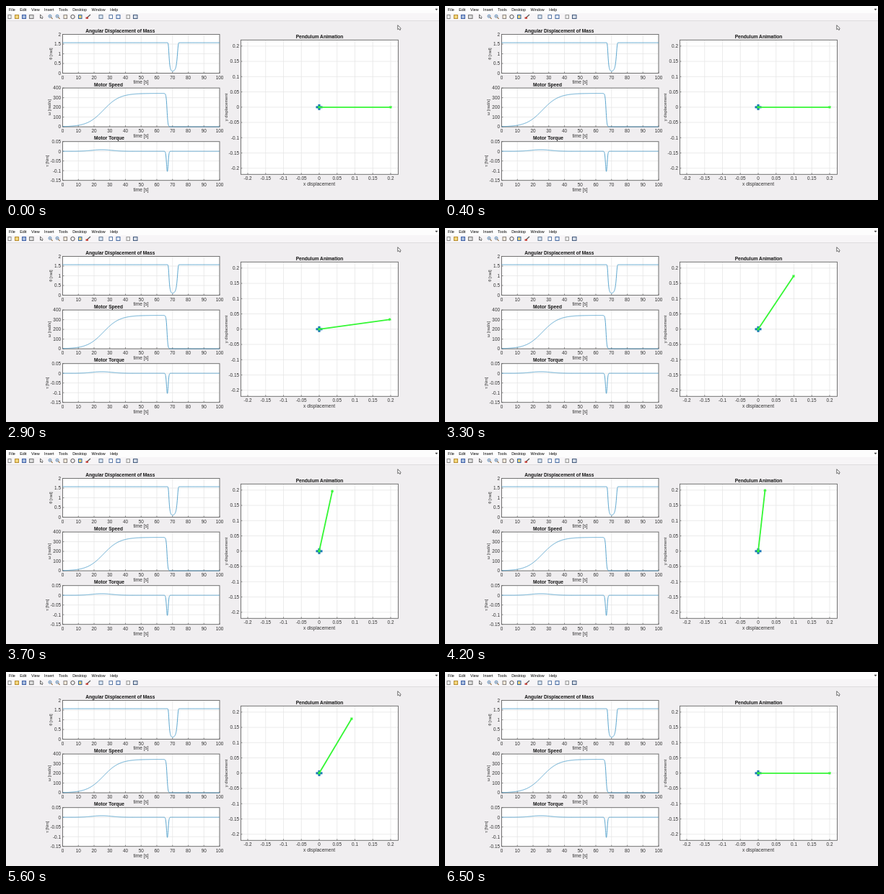
An HTML page with a canvas that plays this animation: 600 px wide and 270 px high, repeating every 7900 ms.

```html
<!DOCTYPE html>
<html lang="en">
<head>
<meta charset="utf-8">
<title>Pendulum Animation</title>
<style>
html, body { margin: 0; width: 100%; height: 100%; overflow: hidden; background: #f0eef0; }
canvas, svg { position: absolute; left: 0; top: 0; width: 600px; height: 270px; display: block; }
text { font-family: "Liberation Sans", Arial, sans-serif; font-size: 6.4px; fill: #333; }
.title { font-size: 6.6px; font-weight: bold; fill: #111; }
.label { font-size: 6.6px; }
.side { font-size: 5.8px; }
.menu { font-size: 5.4px; fill: #000; }
</style>
</head>
<body>
<canvas id="stage" width="600" height="270"></canvas>
<svg id="words" viewBox="0 0 600 270"></svg>
<script>
const LOOP = 7900, STEP = 100, SWING_START = 2600, SWING_STEPS = 39;
const ctx = document.getElementById('stage').getContext('2d');
const words = document.getElementById('words');
const BLUE = '#3f97c6', GREEN = '#35f735';
const PIVOT = { x: 434, y: 140.8 }, REACH = { x: 99, y: 85 };

// S-shaped decay from 1 to 0, halfway at `half`
const decay = (n, half, power) => 1 / (1 + (Math.max(0, n) / half) ** power);

// pendulum angle from vertical: a quick fall, a rest near the top, a slower return
const angleAt = n => .06 + 1.511 * Math.max(decay(n, 5.52, 3.5), decay(SWING_STEPS - n, 6.55, 3.1));

const sigmoid = x => 1 / (1 + Math.exp(-x));
const bell = x => Math.exp(-x * x);
const displacement = t => angleAt((t - 66.8) / .19);
const speed = t => 345 * sigmoid((t - 26) / 5.2) * sigmoid((66.5 - t) / .3);
const torque = t => .008 * bell((t - 25) / 9) - .104 * bell((t - 66.7) / .75);

function range(lo, hi, step) {
  const count = Math.round((hi - lo) / step) + 1;
  return Array.from({ length: count }, (_, i) => Number((lo + i * step).toFixed(2)));
}

function write(str, x, y, kind = '', anchor = 'middle', turn = 0) {
  const el = document.createElementNS('http://www.w3.org/2000/svg', 'text');
  el.textContent = str;
  el.setAttribute('class', kind);
  el.setAttribute('text-anchor', anchor);
  el.setAttribute('transform', `translate(${x} ${y}) rotate(${turn})`);
  words.appendChild(el);
  return el;
}

function box(x, y, w, h, color) {
  ctx.fillStyle = color;
  ctx.fillRect(x, y, w, h);
}

function path(points, color, width = 1, fill) {
  ctx.beginPath();
  points.forEach(([x, y]) => ctx.lineTo(x, y));
  if (fill) { ctx.closePath(); ctx.fillStyle = fill; ctx.fill(); }
  ctx.strokeStyle = color;
  ctx.lineWidth = width;
  ctx.stroke();
}

function ring(x, y, r, color) {
  ctx.beginPath();
  ctx.arc(x, y, r, 0, 7);
  ctx.strokeStyle = color;
  ctx.lineWidth = .9;
  ctx.stroke();
}

function axes(x, y, w, h, xs, ys) {
  box(x, y, w, h, '#fff');
  xs.forEach(p => path([[p, y], [p, y + h]], '#e6e6e6', .8));
  ys.forEach(p => path([[x, p], [x + w, p]], '#e6e6e6', .8));
  xs.forEach(p => path([[p, y + h], [p, y + h - 2]], '#666', .7));
  ys.forEach(p => path([[x, p], [x + 2, p]], '#666', .7));
  ctx.strokeStyle = '#666';
  ctx.lineWidth = .9;
  ctx.strokeRect(x, y, w, h);
}

function graph(row, lo, hi, step, fn, title, titleX, side) {
  const left = 78.5, w = 217.5, h = 54, top = 39.5 + 74.6 * row;
  const px = t => left + t * w / 100;
  const py = v => top + (hi - v) / (hi - lo) * h;
  const times = range(0, 100, 10), values = range(lo, hi, step);
  axes(left, top, w, h, times.map(px), values.map(py));
  times.forEach(t => write(t, px(t), top + h + 8.3));
  values.forEach(v => write(v, 76, py(v) + 2.3, '', 'end'));
  write(title, titleX, top - 2.6, 'title');
  write('time [s]', 187, top + h + 14.9, 'label');
  write(side, 64 - 2.3 * row, top + 27, 'side', 'middle', -90);
  path(range(0, 100, .1).map(t => [px(t), py(fn(t))]), BLUE, .85);
}

// small framed icon, 6 px high
function icon(x, w, edge, fill) {
  box(x, 12, w, 6, edge);
  box(x + 1, 13, w - 2, 4, fill);
}

function lens(x) {
  ring(x, 14.2, 2, '#4f86b5');
  path([[x + 1.5, 15.7], [x + 3.5, 18]], '#8b6336', 1.1);
  box(x - .8, 13.8, 1.6, .8, '#446');
}

function pointer(x, y, s) {
  path([[x, y], [x, y + 5 * s], [x + 1.5 * s, y + 4 * s], [x + 2.6 * s, y + 5.8 * s], [x + 3.6 * s, y + 3.5 * s]],
    '#444', .8, '#fff');
}

function toolbar() {
  box(0, 0, 600, 10, '#fdfdfd');
  box(0, 10, 600, 10, '#f7f5f7');
  box(0, 20, 600, 1, '#dedcde');
  let x = 4;
  for (const name of 'File Edit View Insert Tools Desktop Window Help'.split(' ')) {
    x += write(name, x, 7, 'menu', 'start').getComputedTextLength() + 6.5;
  }
  path([[595, 4], [598, 4], [596.5, 6]], '#444', .5, '#444');

  icon(2.5, 5, '#888', '#fff');
  icon(12, 6, '#b98e32', '#f3d67c');
  icon(22, 6, '#3e61a8', '#a9bddd');
  icon(32, 6.5, '#777', '#ddd');
  pointer(47.5, 12, 1);
  lens(61);
  lens(71);
  icon(79.5, 5.5, '#8a8580', '#f8eadb');
  ring(92.5, 15, 2.7, '#444');
  icon(100, 5.5, '#3568a8', '#e8d27a');
  path([[117, 12], [112.5, 16]], '#555', 1.2);
  box(110.5, 15.5, 3.5, 2.3, '#c53d34');
  icon(128.5, 6, '#6d7f96', '#d7e6f6');
  icon(142.5, 5.5, '#5a79a6', '#fff');
  icon(152.5, 6, '#476aa0', '#e6eefa');
  icon(166.5, 5.5, '#999', '#eee');
  icon(176, 6.5, '#445b7d', '#d6dde8');
}

function scene() {
  box(0, 0, 600, 270, '#f0eef0');
  toolbar();
  graph(0, 0, 2, .5, displacement, 'Angular Displacement of Mass', 158.3, 'θ [rad]');
  graph(1, 0, 400, 100, speed, 'Motor Speed', 142, 'ω [rad/s]');
  graph(2, -.15, .05, .05, torque, 'Motor Torque', 143, 'τ [Nm]');

  const marks = range(-.2, .2, .05);
  const px = v => PIVOT.x + v / .2 * REACH.x, py = v => PIVOT.y - v / .2 * REACH.y;
  axes(325.5, 47.3, 218, 187, marks.map(px), marks.map(py));
  marks.forEach(v => {
    write(v, px(v), 242.3);
    write(v, 323, py(v) + 2.3, '', 'end');
  });
  write('Pendulum Animation', 434.5, 45.1, 'title');
  write('x displacement', 434, 249.8, 'label');
  write('y displacement', 307, 141, 'side', 'middle', -90);
  pointer(542.8, 26.7, 1.2);
}

function star(x, y, r) {
  for (let i = 0; i < 4; i++) {
    const dx = r * Math.cos(i * Math.PI / 4), dy = r * Math.sin(i * Math.PI / 4);
    path([[x - dx, y - dy], [x + dx, y + dy]], GREEN, 1);
  }
}

function pendulum(angle) {
  const { x, y } = PIVOT;
  const tx = x + REACH.x * Math.sin(angle), ty = y - REACH.y * Math.cos(angle);
  box(x - 4.5, y - 1.5, 9, 3, '#1878b4');
  box(x - 1.6, y - 4, 3.2, 8, '#1878b4');
  path([[x, y], [tx, ty]], GREEN, 1.8);
  star(x, y, 2);
  star(tx, ty, 2);
}

scene();
const back = document.createElement('canvas');
back.width = 600;
back.height = 270;
back.getContext('2d').drawImage(ctx.canvas, 0, 0);

const begin = performance.now();
function draw(now) {
  const t = Math.max(0, now - begin) % LOOP;
  ctx.drawImage(back, 0, 0);
  pendulum(angleAt(Math.floor((t - SWING_START) / STEP)));
  requestAnimationFrame(draw);
}
draw(begin);
</script>
</body>
</html>
```
